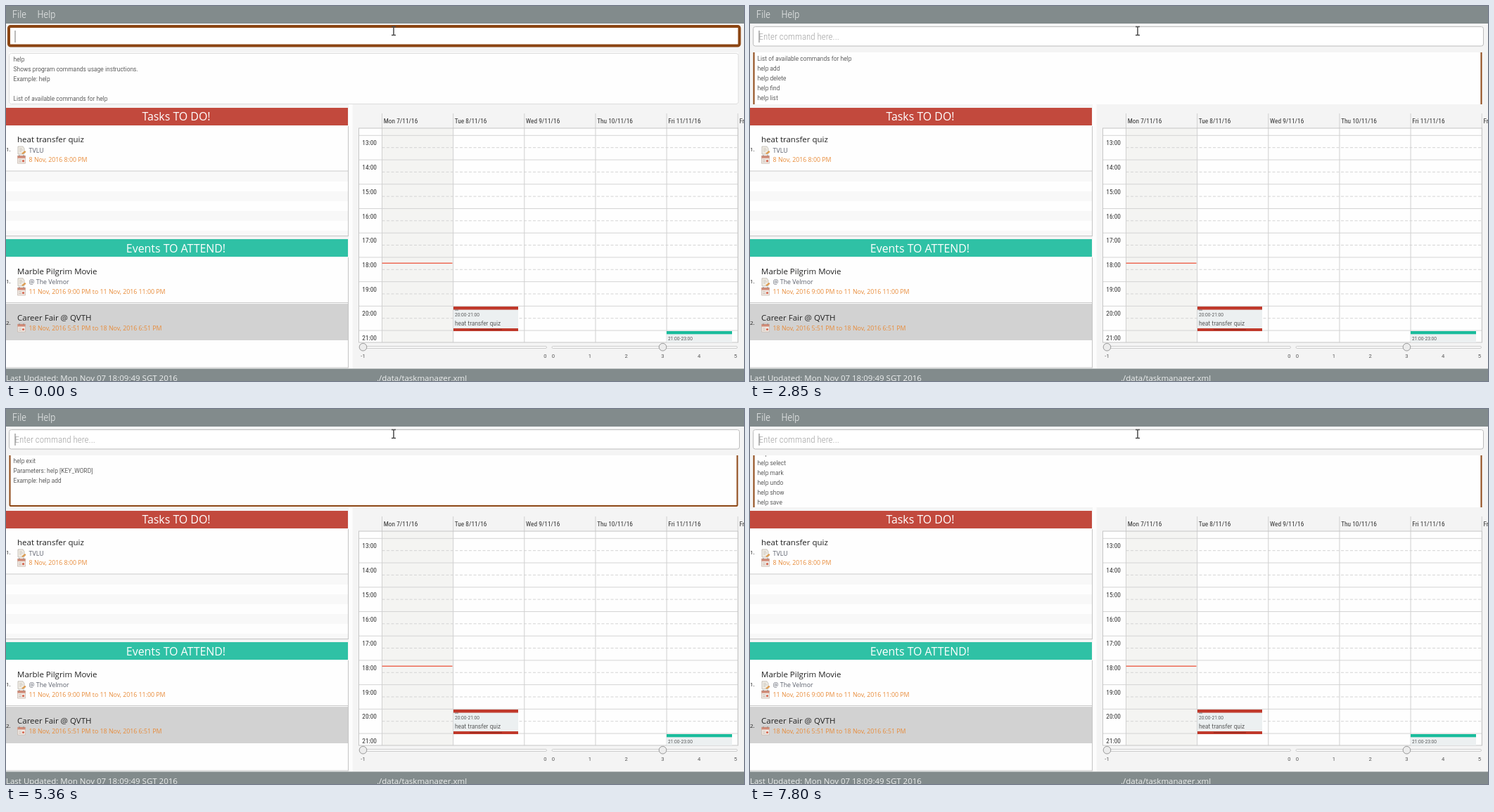
Recreate the animation shown at these times as an HTML page. Size 1049 by 534 pixels, loop 7990 ms.

```html
<!DOCTYPE html>
<html lang="en">
<head>
<meta charset="utf-8">
<title>Task manager</title>
<style>
  html, body { margin: 0; width: 100%; height: 100%; overflow: hidden; background: #f4f4f4; }
  svg { display: block; width: 100vw; height: 100vh; }
  text { white-space: pre; font-family: "Open Sans", "Noto Sans", sans-serif; fill: #222; }
  .narrow { font-family: "Roboto Condensed", Roboto, sans-serif; font-stretch: 75%; fill: #333; }
  .tracked .narrow { letter-spacing: -.064em; }
  .light { font-weight: 300; }
  .bar { fill: #eceeee; }
  .title { fill: #fff; }
  .place { fill: #5a5f6b; }
  .date { fill: #e88b38; }
  .hint { fill: #a2a2a2; }
  .help, .event { fill: #1c1c1c; }
  .tick { font-family: Roboto, sans-serif; fill: #555; }
</style>
</head>
<body>
<svg id="stage" viewBox="0 0 1049 534" preserveAspectRatio="none"></svg>
<script>
const LOOP = 7990;
const FOCUS_AT = 900, BOTTOM_AT = 5360;
const DOWN_TIMES = [2140, 2260, 2400, 2690, 2850, 3060, 3320, 3460, 3720, 3850, 4090, 4270, 4450, 4690, 4750];
const UP_TIMES = [6710, 6970, 7050, 7220, 7440, 7590, 7800];
const LINE = 14;
const HELP_LINES = [
  'help', 'Shows program commands usage instructions.', 'Example: help', '',
  'List of available commands for help',
  ...['add', 'delete', 'find', 'list', 'select', 'mark', 'undo', 'show', 'save', 'clear', 'exit'].map(c => 'help ' + c),
  'Parameters: help [KEY_WORD]', 'Example: help add'
];
const BROWN = '#8b4513', RED = '#c0392b', TEAL = '#1abc9c', GREY = '#828b8c';

const range = n => [...Array(n).keys()];
const rect = (x, y, w, h, fill, extra = '') =>
  `<rect x="${x}" y="${y}" width="${w}" height="${h}" fill="${fill}" ${extra}/>`;
const line = (x1, y1, x2, y2, stroke = '#d0d0d0', extra = '') =>
  `<path d="M${x1} ${y1}L${x2} ${y2}" stroke="${stroke}" ${extra}/>`;
// y is the middle of the capitals
const text = (x, y, size, str, cls = '', anchor = 'start') =>
  `<text x="${x}" y="${y + size * .36}" font-size="${size}" class="${cls}" text-anchor="${anchor}">${str}</text>`;

const noteIcon = y => `<g transform="translate(16 ${y - 5.5})">
    <path d="M1 0H8L10 3V11H1Z" fill="#f0ece4" stroke="#b5b0a8" stroke-width=".7"/>
    <path d="M3 3H7M3 5H8M3 7H6" stroke="#bdb8b0" stroke-width=".7"/>
    <path d="M6 10L11 6L12.5 8L8 11Z" fill="#dc9a4c"/></g>`;

const dateIcon = y => `<g transform="translate(16 ${y - 5.5})">
    <path d="M.5 0H11.5V11H.5Z" fill="#f0e8e2" stroke="#c4b5ab" stroke-width=".7"/>
    <path d="M.5 0H11.5V3.5H.5Z" fill="#d08a76"/>
    <path d="M3 -1V1M9 -1V1" stroke="#888"/>
    <path d="M2 6H6M2 8.5H6" stroke="#c6bab2" stroke-width=".9"/>
    <circle cx="8.5" cy="7.5" r="1.6" fill="#d4654f"/></g>`;

function card(number, nameY, name, dateY, date, place) {
  const placeY = dateY - 13.2;
  return text(0, (nameY + dateY) / 2, 8, number + '.') + text(16, nameY, 11.5, name) +
    (place ? noteIcon(placeY) + text(32.6, placeY, 8.8, place, 'place') : '') +
    dateIcon(dateY) + text(32.6, dateY, 8.8, date, 'date');
}

function lists() {
  return rect(487, 140, 5.5, 376, '#fdfdfd') +
    rect(0, 145, 486, 25, '#c2493d') + text(242, 157.5, 15.9, 'Tasks TO DO!', 'title', 'middle') +
    rect(0, 171, 486, 157, '#fefefe') +
    range(4).map(i => rect(0, 236 + i * 28, 486, i < 3 ? 14 : 7, '#f8f8f8')).join('') +
    line(0, 235, 486, 235, '#c8c8c8') + line(0, 327.5, 487, 327.5, '#c4c4c4') +
    card(1, 190, 'heat transfer quiz', 218.7, '8 Nov, 2016 8:00 PM', 'TVLU') +
    rect(0, 332, 486, 25, '#2fc1a5') + text(241.5, 345, 15.9, 'Events TO ATTEND!', 'title', 'middle') +
    rect(0, 358, 486, 157, '#fefefe') + rect(0, 424, 486, 52, '#d2d2d2') +
    line(0, 422.5, 486, 422.5, '#c8c8c8') + line(0, 515, 487, 515, '#c8c8c8') +
    card(1, 378, 'Marble Pilgrim Movie', 406.5, '11 Nov, 2016 9:00 PM to 11 Nov, 2016 11:00 PM', '@ The Velmor') +
    card(2, 443.5, 'Career Fair @ QVTH', 458.5, '18 Nov, 2016 5:51 PM to 18 Nov, 2016 6:51 PM') +
    line(486.5, 171, 486.5, 328, '#c4c4c4') + line(486.5, 358, 486.5, 515, '#c4c4c4');
}

function calendar() {
  const dayX = i => 534.5 + i * 101.15;
  const hourY = h => 184.3 + (h - 13) * 34.72;
  const days = ['Mon 7/11/16', 'Tue 8/11/16', 'Wed 9/11/16', 'Thu 10/11/16', 'Fri 11/11/16', 'Fr'];
  const hours = range(9).map(i => i + 13);
  const slider = (x1, x2, thumb) =>
    rect(x1, 484.5, x2 - x1, 3, '#f8f8f8', 'rx="1.5" stroke="#c3c3c3" stroke-width=".8"') +
    `<circle cx="${thumb}" cy="485.7" r="5.3" fill="#ececec" stroke="#969696"/>`;
  const tick = (x, label) => text(x, 498.5, 7.6, label, 'tick', 'middle');

  return rect(501.5, 174, 539, 305, '#fefefe') + rect(534.5, 174, 101, 305, '#f4f4f2') +
    hours.map(h =>
      line(501.5, hourY(h), 1040, hourY(h), '#d4d4d4') +
      (h < 21 ? line(534.5, hourY(h + .5), 1040, hourY(h + .5), '#d4d4d4', 'stroke-dasharray="4 2.5"') : '') +
      text(527, hourY(h) + 10.7, 9.4, h + ':00', 'narrow', 'end')).join('') +
    days.map((day, i) =>
      line(dayX(i), 153, dayX(i), 479) + text(dayX(i) + 2.2, 163.3, 9.4, day, 'narrow')).join('') +
    rect(501.5, 174, 539, 305, 'none', 'stroke="#c6c6c6"') +
    line(534.5, 366.2, 634.5, 366.2, '#ee6b56', 'stroke-width="1.5"') +
    rect(636, 428, 92, 35, '#ecf0f1') + rect(636, 428, 92, 4.5, RED) + rect(636, 459, 92, 4, RED) +
    line(659, 460.8, 705, 460.8, '#8d2a20') + line(638, 433, 643, 433, '#777') +
    text(638, 439, 7.7, '20:00-21:00', 'narrow light event') +
    text(638, 451.5, 9.6, 'heat transfer quiz', 'narrow light event') +
    rect(939, 463, 93, 16, '#ecf0f1') + rect(939, 463, 93, 4.3, TEAL) +
    text(941, 473.6, 7.7, '21:00-23:00', 'narrow light event') +
    slider(504, 768.5, 507.5) + slider(776, 1039.5, 933.5) +
    tick(507.5, '-1') + tick(766.5, '0') + range(6).map(i => tick(778 + i * 51.8, i)).join('');
}

function header() {
  return rect(0, 0, 1049, 25, GREY) +
    text(9, 11.5, 14.6, 'File', 'narrow light bar') + text(44.5, 11.5, 14.6, 'Help', 'narrow light bar') +
    `<g id="commandFocused">${rect(4, 29, 1038.5, 27.5, '#fff', `rx="2.5" stroke="${BROWN}" stroke-width="4"`)}</g>
     <g id="commandIdle">${rect(4.5, 29.5, 1038, 27.5, '#fff', 'rx="3" stroke="#bcbcbc"')}
       ${text(12.5, 43.5, 13, 'Enter command here...', 'narrow light hint')}</g>` +
    line(13, 35, 13, 52, '#777') +
    `<path d="M548 29.5H550.3L551 30.3L551.7 29.5H554M551 30V41M548 41.5H550.3L551 40.7L551.7 41.5H554"
       fill="none" stroke="#4a4a4a" stroke-width="1.5"/>`;
}

function helpArea() {
  const lines = HELP_LINES.map((str, i) =>
    `<text x="10.5" y="${79 + i * LINE}" font-size="9.7" class="narrow light help">${str}</text>`).join('');
  return `<clipPath id="view"><rect x="2" y="66" width="1041" height="74"/></clipPath>
    <g clip-path="url(#view)">
      ${rect(4, 66, 1037, 74, '#fefefe')}
      <g id="helpIdle">${rect(4.5, 67.5, 1036.5, 72, 'none', 'rx="3" stroke="#dcdcdc"')}</g>
      <g id="helpContent">
        <g id="helpFocused">${rect(5.5, 67.5, 1034, 282.5, 'none', `rx="1" stroke="${BROWN}" stroke-width="2"`)}</g>
        ${lines}
      </g>
    </g>`;
}

function footer() {
  return rect(0, 516.5, 1049, 17.5, GREY) +
    text(0, 529.5, 11.5, 'Last Updated: Mon Nov 07 18:09:49 SGT 2016', 'bar') +
    text(527, 529.5, 11.5, './data/taskmanager.xml', 'bar');
}

const stage = document.getElementById('stage');
stage.innerHTML = rect(0, 0, 1049, 534, '#f4f4f4') + header() + helpArea() + lists() + calendar() + footer();

// Tighten regular Roboto when no condensed face is available.
const probe = document.createElementNS('http://www.w3.org/2000/svg', 'text');
probe.textContent = HELP_LINES[1];
probe.setAttribute('font-size', 20);
stage.append(probe);
const widthOf = cls => { probe.setAttribute('class', cls); return probe.getComputedTextLength(); };
stage.classList.toggle('tracked', widthOf('narrow') > widthOf('tick') * .96);
probe.remove();

const byId = id => document.getElementById(id);
const show = (id, visible) => byId(id).setAttribute('visibility', visible ? 'visible' : 'hidden');

function scrollAt(t) {
  const passed = times => times.filter(s => s <= t).length;
  const downs = passed(DOWN_TIMES), ups = passed(UP_TIMES);
  if (ups) return 209 - LINE * (ups - 1);
  if (t >= BOTTOM_AT) return 212;
  return downs ? 1 + LINE * (downs - 1) : 0;
}

function draw() {
  const t = performance.now() % LOOP;
  const reading = t >= FOCUS_AT;
  show('commandFocused', !reading);
  show('commandIdle', reading);
  show('helpIdle', !reading);
  show('helpFocused', reading);
  byId('helpContent').setAttribute('transform', `translate(0 ${-scrollAt(t)})`);
  requestAnimationFrame(draw);
}
draw();
</script>
</body>
</html>
```
